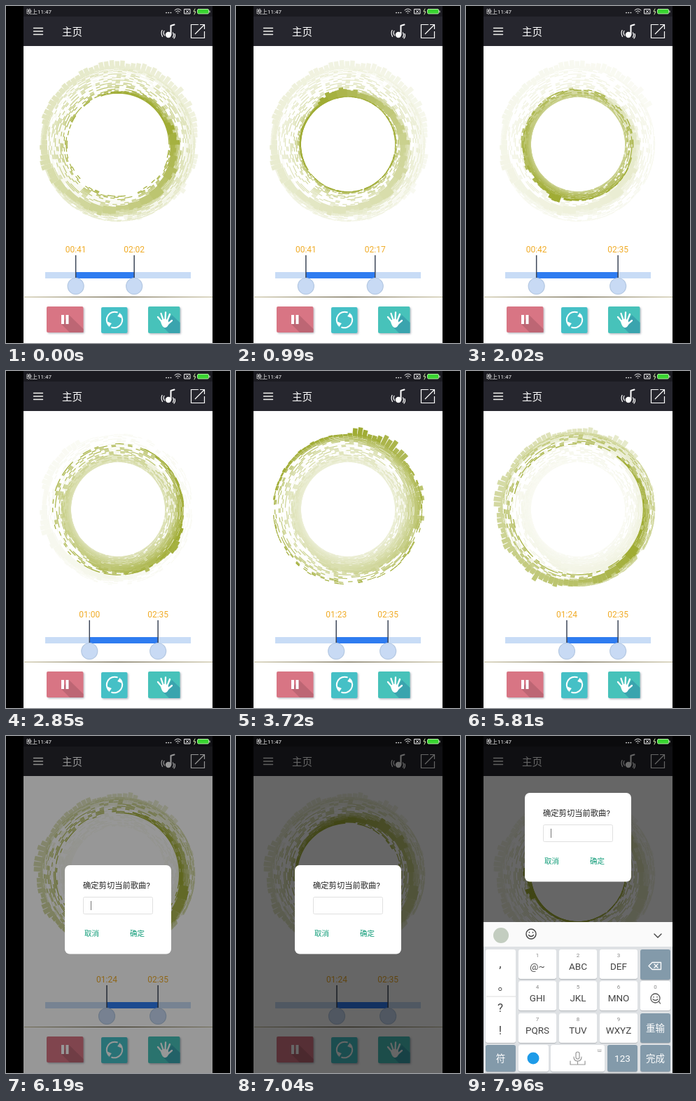
These frames come from a looping animation (320 px wide and 480 px high, 8 s). An HTML page with a canvas:

```html
<!DOCTYPE html>
<html lang="zh">
<head>
<meta charset="utf-8">
<title>主页</title>
<style>
html, body { margin: 0; width: 100%; height: 100%; overflow: hidden; background: #000; }
#stage { position: relative; width: 320px; height: 480px; overflow: hidden; background: #000; }
#stage > * { position: absolute; left: 0; top: 0; width: 320px; height: 480px; }
text { font-family: Roboto, "Noto Sans CJK SC", "Noto Sans CJK", sans-serif; }
.mid { text-anchor: middle; }
.line { fill: none; stroke-linecap: round; stroke-linejoin: round; }
#dim { animation: dim 8s linear infinite; }
#dialog { animation: appear 8s linear infinite, lift 8s ease-out infinite; }
#caret { animation: blink 8s step-end infinite; }
#keyboard { animation: slide 8s ease-out infinite; }
@keyframes dim {
  0%, 75.6% { background: rgba(0, 0, 0, 0); }
  77.3% { background: rgba(0, 0, 0, .4); }
  79.2%, 100% { background: rgba(0, 0, 0, .6); }
}
@keyframes appear { 0%, 75.6% { opacity: 0; } 77%, 100% { opacity: 1; } }
@keyframes lift { 0%, 95.5% { transform: none; } 98.3%, 100% { transform: translateY(-103px); } }
@keyframes slide { 0%, 95.5% { transform: translateY(216px); } 98.3%, 100% { transform: none; } }
@keyframes blink { 0% { opacity: 0; } 76% { opacity: 1; } 82% { opacity: 0; } 89% { opacity: 1; } 94% { opacity: 0; } 95.5%, 100% { opacity: 1; } }
</style>
</head>
<body>
<div id="stage">
  <svg viewBox="0 0 320 480">
    <defs>
      <linearGradient id="rule"><stop stop-color="#c4bc98"/><stop offset=".5" stop-color="#4a4020"/><stop offset="1" stop-color="#c4bc98"/></linearGradient>
      <filter id="shadow" x="-20%" y="-20%" width="150%" height="150%"><feDropShadow dx="1.500" dy="1.500" stdDeviation="1.3" flood-color="#778" flood-opacity=".5"/></filter>
    </defs>
    <path fill="#fff" d="M25 57h270v423H25z"/>
    <path fill="#26262e" d="M25 15h270v42H25z"/>
    <path fill="#1b1b21" d="M25 0h270v15H25z"/>
    <path class="line" stroke="#f4f4f0" stroke-width="1.400" d="M39.500 31.500h13M39.500 36h13M39.500 40.500h13"/>
    <text x="80" y="41.500" font-size="14.500" fill="#fff">主页</text>
    <g class="line" stroke="#fff" stroke-width="1.200">
      <circle cx="232" cy="41" r="3.600" fill="#fff"/>
      <path stroke-width="2" d="M235.500 40.500V28l5-1.500"/>
      <path d="M226 35.500q-2 3 .5 6.500M223 34.500q-2 4.500 .5 9M238.500 38q2 3 0 6.500M241 39.500q1.500 3.500-1 6.500"/>
      <path stroke-linecap="butt" stroke-linejoin="miter" d="M275 26.500H264.500V45.500H283.500V36M270 40L283 27M277 26.500h6.500V33"/>
    </g>
    <path fill="#c8dcf6" d="M56 379h208v9H56z"/>
    <rect id="range" y="379" height="9" fill="#2f7cf0"/>
    <g id="from"><path stroke="#3c4658" stroke-width="1.500" d="M0 355v33"/><circle cy="399" r="11.500" fill="#c8daf4" stroke="#b4c8e2" stroke-width="1.200"/><text class="mid" y="351" font-size="12" fill="#f0ac28"></text></g>
    <g id="to"><path stroke="#3c4658" stroke-width="1.500" d="M0 355v33"/><circle cy="399" r="11.500" fill="#c8daf4" stroke="#b4c8e2" stroke-width="1.200"/><text class="mid" y="351" font-size="12" fill="#f0ac28"></text></g>
    <path fill="url(#rule)" d="M26 414h269v1H26z"/>
    <g filter="url(#shadow)">
      <rect x="58" y="428" width="52.500" height="37" rx="2" fill="#d87584"/>
      <rect x="136" y="429" width="37.500" height="37" rx="2" fill="#45c0c6"/>
      <rect x="203" y="428" width="45.500" height="38" rx="2" fill="#46c2ba"/>
    </g>
    <path fill="#bd6674" d="M90 440l20.500 20v5H91L79 453z"/>
    <path fill="#fff" d="M79 440h4v13h-4zM85.500 440h4v13h-4z"/>
    <g transform="rotate(35 155 447)">
      <path class="line" stroke="#fff" stroke-width="2" d="M152 436a11.500 11.500 0 0 0 0 22M158 458a11.500 11.500 0 0 0 0-22"/>
      <path fill="#fff" d="M147.500 455l7-1.500v6.500zM162.500 439l-7 1.500V434z"/>
    </g>
    <path fill="#3aa4ae" d="M237 440l11.500 11v15H233l-9-9z"/>
    <g class="line" stroke="#fff" stroke-width="2.300">
      <path d="M222 449l-5-6M224.500 447l-3-9M227.500 446.500l.5-10M230.500 448l3.500-9M231 453l6-5"/>
      <path fill="#fff" d="M222 449q4.500-4 8.500-.5l1 4q-2 4.500-4.500 4.500-3 0-5-8z"/>
    </g>
  </svg>
  <canvas id="ring" width="320" height="480"></canvas>
  <div id="dim" style="left:25px;width:270px"></div>
  <svg viewBox="0 0 320 480">
    <text x="29" y="11" font-size="8" fill="#f4f4f4">晚上11:47</text>
    <g class="line" stroke="#f0f0f0" stroke-width="1">
      <path stroke-width="1.700" d="M229 9.500h.1M232.200 9.500h.1M235.400 9.500h.1"/>
      <path d="M241 6q4.500-4 9 0M242.700 8q2.800-2.500 5.600 0M245 10h1"/>
      <path d="M255 4.500h8v6.500h-8zM257.300 6l3.400 3.500M260.700 6l-3.400 3.500"/>
      <path stroke="#d8f0b0" d="M270 4l-2 4h3l-2 4"/>
      <rect x="273.500" y="4.500" width="16" height="6.500" rx="1.500" fill="#38d430" stroke="#b0eca0"/><path d="M291 7v2"/>
    </g>
  </svg>
  <svg id="dialog" viewBox="0 0 320 480">
    <rect x="84" y="184" width="152" height="126.500" rx="7" fill="#fff"/>
    <text x="110" y="217" font-size="11.300" fill="#222">确定剪切当前歌曲?</text>
    <rect x="110.500" y="229.500" width="99" height="24" rx="2" fill="none" stroke="#e0e0e0"/>
    <path id="caret" stroke="#777" d="M121.500 235v13"/>
    <g font-size="10.500" fill="#109c78"><text x="112" y="284.500">取消</text><text x="177" y="284.500">确定</text></g>
  </svg>
  <svg id="keyboard" viewBox="0 0 320 480">
    <path fill="#dee1e4" d="M25 265h270v215H25z"/>
    <path fill="#fafafa" d="M25 265h270v35H25z"/>
    <circle cx="50" cy="284" r="11" fill="#c3cdc0"/>
    <g class="line" stroke="#444" stroke-width="1.400">
      <circle cx="93" cy="282" r="7"/><path d="M89.500 283.500q3.500 4 7 0M90.500 279.500v.5M95.500 279.500v.5M269 282l5 5 5-5"/>
    </g>
    <g id="keys"></g>
    <path stroke="#dcdcdc" d="M29 371h42"/>
    <circle cx="96" cy="459" r="8.500" fill="#1e9be8"/>
    <g class="line" stroke="#fff" stroke-width="1.300"><path d="M261 327.500l5-5h12.500v10H266zM269 325l5 5M274 325l-5 5"/></g>
    <g class="line" stroke="#555" stroke-width="1.300"><path d="M275.500 378l2 3M267 375q3.500 3 7 0M268 371.500v.5M273 371.500v.5"/><circle cx="270.500" cy="373.500" r="6.500"/></g>
    <g class="line" stroke="#999" stroke-width="1.200"><rect x="157" y="450" width="5" height="10" rx="2.500"/><path d="M154 457q0 6 5.500 6t5.500-6M159.500 463v4M149 463v5h21v-5"/></g>
    <text x="188" y="450" font-size="6" fill="#888">Ш</text>
  </svg>
</div>
<script>
const LOOP = 8000, STEP = 100, TRAIL = 50;
const $ = id => document.getElementById(id);
const ctx = $('ring').getContext('2d');
const noise = n => { const v = Math.sin(n * 12.9898) * 43758.5453; return v - Math.floor(v); };
const clamp = v => Math.max(0, Math.min(1, v));
const ease = (t, a, b) => { const p = clamp((t - a) / (b - a)); return p * p * (3 - 2 * p); };

// Keys: x, y, width, height, label, small digit, dark
const columns = [75, 133, 191], rows = [304, 349, 395];
const labels = ['@~', 'ABC', 'DEF', 'GHI', 'JKL', 'MNO', 'PQRS', 'TUV', 'WXYZ'];
const keys = labels.map((s, i) => [columns[i % 3], rows[i / 3 | 0], 54, 42, s, i + 1]);
keys.push([28, 304, 43, 133, ''], [249, 304, 43, 43, '', '', 1], [249, 349, 43, 42, '', '0'],
  [249, 395, 43, 42, '重输', '', 1], [28, 440, 43, 38, '符', '', 1], [75, 440, 43, 38, ''],
  [121, 440, 77, 38, ''], [202, 440, 43, 38, '123', '', 1], [249, 440, 43, 38, '完成', '', 1]);
const label = (x, y, size, fill, s) => `<text class="mid" x="${x}" y="${y}" font-size="${size}" fill="${fill}">${s}</text>`;
$('keys').innerHTML = keys.map(([x, y, w, h, s, digit = '', dark]) =>
  `<rect x="${x}" y="${y + 1}" width="${w}" height="${h}" rx="3" fill="#b2b6ba"/>
   <rect x="${x}" y="${y}" width="${w}" height="${h}" rx="3" fill="${dark ? '#839aaa' : '#fff'}"/>` +
  label(x + w / 2, y + h / 2 + (dark ? 5 : 8), 13.5, dark ? '#fff' : '#444', s) +
  label(x + w / 2, y + 11, 8, '#888', digit)).join('') +
  [',', '。', '?', '!'].map((s, i) => label(s === '。' ? 54 : 49, [330, 362, 393, 425][i], 17, '#444', s)).join('');

// Olive that fades towards white with age in seconds
function trailColor(age) {
  const strength = Math.exp(-age / 1.7);
  return `rgb(${[160, 172, 52].map(c => 255 - (255 - c) * strength)})`;
}

// Spectrum height: a tall bass block, a low band, then sparse specks
function barHeight(i, n, loud) {
  if (i < 3) return loud * (10 + 6 * n);
  if (i < 26) return 1 + loud * 5 * n * Math.exp(-i / 20);
  return n > .6 ? 1.2 : 0;
}

// A rotating spectrum whose radius breathes and leaves a fading trail
function drawRing(t) {
  ctx.clearRect(0, 0, 320, 480);
  ctx.lineWidth = 6.5;
  const now = Math.floor(t / STEP);
  for (let k = TRAIL; k >= 0; k--) {
    const step = now - k, s = step * STEP / 1000;
    const start = 2.96 + 2 * (s - 3.72);
    const radius = 67 + 21 * (1 + Math.cos(2 * Math.PI * (s - 4.3) / 7));
    const loud = .35 + .65 * noise(step + 500);
    ctx.strokeStyle = trailColor(k * STEP / 1000);
    ctx.beginPath();
    for (let i = 0; i < 96; i++) {
      const height = barHeight(i, noise(step * 97 + i), loud);
      if (!height) continue;
      const a = start + i * .0655, x = Math.sin(a), y = Math.cos(a);
      ctx.moveTo(160 + x * radius, 197 + y * radius);
      ctx.lineTo(160 + x * (radius + height), 197 + y * (radius + height));
    }
    ctx.stroke();
  }
}

const position = sec => 57.3 + sec * 1.03;
const clock = sec => [sec / 60, sec % 60].map(v => String(Math.floor(v)).padStart(2, '0')).join(':');
function setHandle(id, sec) {
  $(id).setAttribute('transform', `translate(${position(sec)} 0)`);
  $(id).lastChild.textContent = clock(sec);
}
function drawSlider(t) {
  const from = 41.1 + ease(t, 600, 1800) + 41.3 * ease(t, 2300, 3500) + .8 * ease(t, 5200, 5900);
  const to = 122.2 + 33 * ease(t, 400, 1650);
  setHandle('from', from);
  setHandle('to', to);
  $('range').setAttribute('x', position(from));
  $('range').setAttribute('width', position(to) - position(from));
}

let origin;
function tick(now) {
  origin ??= now;
  const t = (now - origin) % LOOP;
  drawRing(t);
  drawSlider(t);
  requestAnimationFrame(tick);
}
requestAnimationFrame(tick);
</script>
</body>
</html>
```
